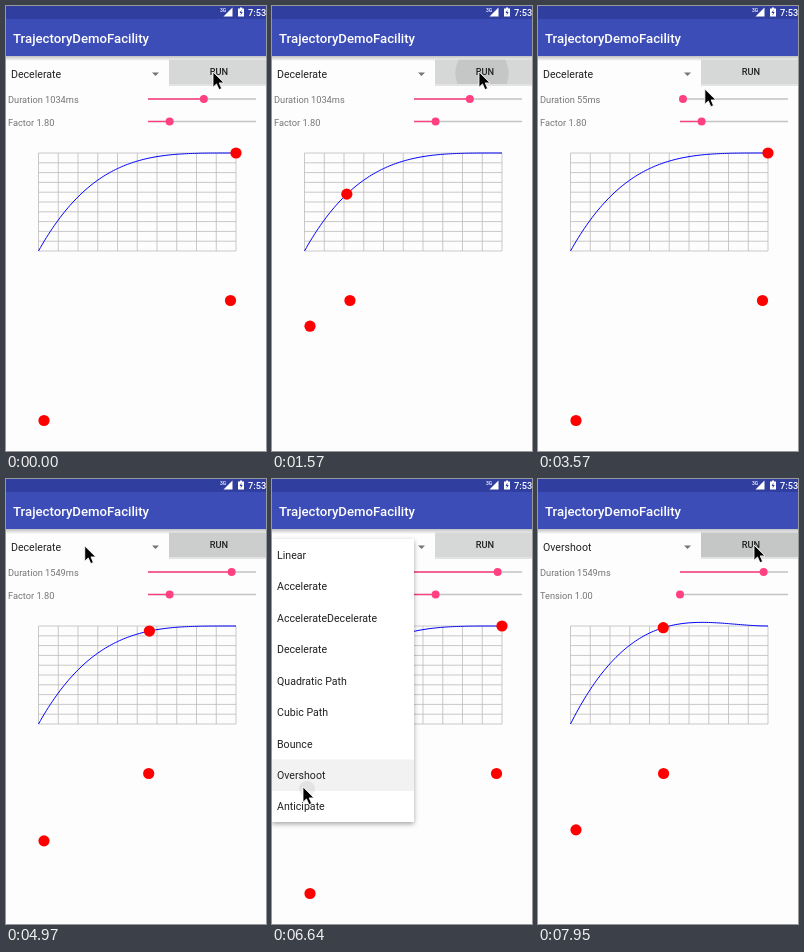
An HTML page that plays this animation: 260 by 445 pixels, repeating every 8 s.

```html
<!DOCTYPE html>
<html lang="en">
<head>
<meta charset="utf-8">
<title>Interpolator demo</title>
<style>
  html, body { margin: 0; width: 100%; height: 100%; overflow: hidden; background: #fdfdfd; }
  svg { display: block; width: 260px; height: 445px; font-family: Roboto, sans-serif; }
  .label { font-size: 9.24px; fill: #757575; }
  .item { font-size: 10.6px; fill: #212121; }
  .medium { font-weight: 500; }
  .rail { stroke: #c4c4c4; stroke-width: 1.3; }
  .fill { stroke: #ff4081; stroke-width: 1.4; }
  .thumb { fill: #ff4081; }
  .dot { fill: #f00; }
</style>
</head>
<body>
<svg viewBox="0 0 260 445">
  <defs>
    <linearGradient id="shade" x2="0" y2="1">
      <stop stop-color="#000" stop-opacity=".24"/>
      <stop offset="1" stop-color="#000" stop-opacity="0"/>
    </linearGradient>
    <filter id="soft" x="-20%" y="-20%" width="140%" height="140%">
      <feDropShadow dx="0" dy="2" stdDeviation="2.5" flood-opacity=".35"/>
    </filter>
    <clipPath id="buttonClip"><rect x="163" y="53.5" width="97" height="24.5"/></clipPath>
  </defs>

  <rect width="260" height="445" fill="#fdfdfd"/>
  <rect y="50" width="260" height="5" fill="url(#shade)"/>
  <rect width="260" height="50" fill="#3d4db7"/>
  <rect width="260" height="13" fill="#303f9f"/>
  <g fill="#fff">
    <text class="medium" x="214" y="6" font-size="5">3G</text>
    <path d="M217.500 10.500H226.500V1.500Z"/>
    <path d="M232 2.500H234V1.500H236V2.500H238V10.500H232Z"/>
    <path d="M235.500 3.500L233.500 7H235L234.500 9.500L236.700 6H235.200Z" fill="#303f9f"/>
    <text class="medium" x="242" y="9.700" font-size="9.240">7:53</text>
    <text class="medium" x="7" y="36.800" font-size="13.200">TrajectoryDemoFacility</text>
  </g>

  <text class="item" id="choice" x="5" y="72.300"></text>
  <path d="M146 66.500H153L149.500 70Z" fill="#757575"/>

  <rect x="163" y="78" width="97" height="2" fill="#000" opacity=".1"/>
  <rect x="163" y="53.500" width="97" height="24.500" fill="#d6d7d7"/>
  <circle id="ripple" cy="67" clip-path="url(#buttonClip)"/>
  <text class="medium" x="213" y="69.300" font-size="9.240" fill="#212121" text-anchor="middle">RUN</text>

  <text class="label" id="durationText" x="2" y="96.800"></text>
  <text class="label" id="factorText" x="2" y="119.800"></text>
  <path class="rail" d="M142 93H250M142 115.500H250"/>
  <path class="fill" id="durationFill"/>
  <path class="fill" id="factorFill"/>
  <circle class="thumb" id="durationThumb" cy="93"/>
  <circle class="thumb" id="factorThumb" cy="115.500" r="4"/>

  <path id="grid" stroke="#bcbcbc" stroke-width=".8"/>
  <path id="curve" fill="none" stroke="#00f" stroke-width="1"/>
  <circle class="dot" id="graphDot" r="5.600"/>
  <circle class="dot" id="acrossDot" r="5.600" cy="294.500"/>
  <circle class="dot" id="downDot" r="5.600" cx="38"/>

  <g id="popup">
    <rect y="60" width="142" height="283" fill="#fff" filter="url(#soft)"/>
    <g id="pressed">
      <rect y="280.500" width="142" height="31.500" fill="#f2f2f2"/>
      <circle cx="35" cy="310" r="8" fill="#000" opacity=".06"/>
    </g>
  </g>
  <path id="cursor" d="M0 0V15.200L3.500 11.900L6 17.600L8.600 16.500L6.200 10.900H11Z" stroke="#fff" stroke-width=".8"/>
</svg>

<script>
const LOOP = 8000;
const GRAPH = { x: 32.5, y: 245, w: 197.5, h: 98 };
const FACTOR = 1.8, TENSION = 1, SWITCH = 6750;
const $ = id => document.getElementById(id);
const set = (id, attrs) => {
  for (const name in attrs) $(id).setAttribute(name, attrs[name]);
};
const clamp = v => Math.max(0, Math.min(1, v));

const decelerate = p => 1 - (1 - p) ** (2 * FACTOR);
const overshoot = p => (p - 1) ** 2 * ((TENSION + 1) * (p - 1) + TENSION) + 1;

// [start, length] of every run
const runs = [[-2000, 1034], [390, 1034], [1504, 1034], [2770, 55], [3080, 55], [4654, 1549], [7733, 1549]];
// [time, value]
const durationKeys = [[0, 1034], [2000, 1034], [2450, 308], [2540, 55], [3830, 55], [4300, 1549], [LOOP, 1549]];
// [time, x, y]
const cursorKeys = [
  [0, 207, 66], [1660, 207, 66], [1950, 197, 93], [2000, 197, 93], [2450, 151, 94], [2540, 145, 94],
  [2610, 145, 94], [2760, 207, 66], [3400, 207, 66], [3570, 167, 83], [3740, 145, 92], [3830, 145, 92],
  [4300, 225, 92], [4350, 225, 92], [4580, 209, 66], [4710, 209, 66], [4970, 79, 67], [5120, 45, 68],
  [5680, 45, 68], [6190, 31, 308], [6740, 31, 308], [7430, 216, 66], [LOOP, 216, 66]
];

function track(keys, t) {
  const i = Math.max(1, keys.findIndex(k => k[0] >= t));
  const a = keys[i - 1], b = keys[i];
  const p = (t - a[0]) / (b[0] - a[0]);
  return a.slice(1).map((v, j) => v + (b[j + 1] - v) * p);
}

const graphPoint = (p, ease) => [GRAPH.x + GRAPH.w * p, GRAPH.y - GRAPH.h * ease(p)];

function curvePath(ease) {
  const points = Array.from({ length: 101 }, (_, i) => graphPoint(i / 100, ease).map(v => v.toFixed(2)));
  return 'M' + points.join('L');
}
const paths = [decelerate, overshoot].map(curvePath);

let grid = '';
for (let i = 0; i <= 10; i++) {
  grid += `M${GRAPH.x + GRAPH.w * i / 10} ${GRAPH.y}v${-GRAPH.h}`;
  grid += `M${GRAPH.x} ${GRAPH.y - GRAPH.h * i / 10}h${GRAPH.w}`;
}
set('grid', { d: grid });

['Linear', 'Accelerate', 'AccelerateDecelerate', 'Decelerate', 'Quadratic Path',
 'Cubic Path', 'Bounce', 'Overshoot', 'Anticipate'].forEach((name, i) => {
  const item = document.createElementNS('http://www.w3.org/2000/svg', 'text');
  item.textContent = name;
  item.setAttribute('class', 'item');
  item.setAttribute('x', 5);
  item.setAttribute('y', 79.8 + 31.45 * i);
  $('popup').append(item);
});

function slider(name, x, y) {
  set(name + 'Fill', { d: `M142 ${y}H${x}` });
  set(name + 'Thumb', { cx: x });
}

function draw(t) {
  const switched = t >= SWITCH;
  const ease = switched ? overshoot : decelerate;
  const [x, y] = track(cursorKeys, t);
  const [duration] = track(durationKeys, t);
  const dragging = (t > 1960 && t < 2600) || (t > 3780 && t < 4340);

  set('cursor', { transform: `translate(${x} ${y})` });
  $('choice').textContent = switched ? 'Overshoot' : 'Decelerate';
  $('durationText').textContent = `Duration ${Math.round(duration)}ms`;
  $('factorText').textContent = switched ? 'Tension 1.00' : 'Factor 1.80';
  slider('duration', 142 + duration * 0.054, 93);
  slider('factor', 142 + 27 * ((switched ? TENSION : FACTOR) - 1), 115.5);
  set('durationThumb', { r: dragging ? 5.5 : 4 });
  set('curve', { d: paths[+switched] });

  // The dots move by the eased fraction, which is also the place on the curve.
  const index = runs.findLastIndex(r => r[0] <= t);
  const [start, length] = runs[index];
  const p = ease(clamp((t - start) / length));
  const [gx, gy] = graphPoint(p, ease);
  set('graphDot', { cx: gx, cy: gy });
  set('acrossDot', { cx: 38 + 186.5 * p });
  set('downDot', { cy: 294.5 + 120 * p });

  const age = t - start;
  set('ripple', {
    cx: 210,
    r: 12 + Math.min(age, 500) * 0.22,
    opacity: index > 1 ? 0.08 * clamp(1 - (age - 220) / 250) : 0
  });

  set('popup', { opacity: clamp((t - 5400) / 220) * clamp((6900 - t) / 150) });
  set('pressed', { opacity: t > 6620 ? 1 : 0 });
}

function frame() {
  draw(performance.now() % LOOP);
  requestAnimationFrame(frame);
}
frame();
</script>
</body>
</html>
```
